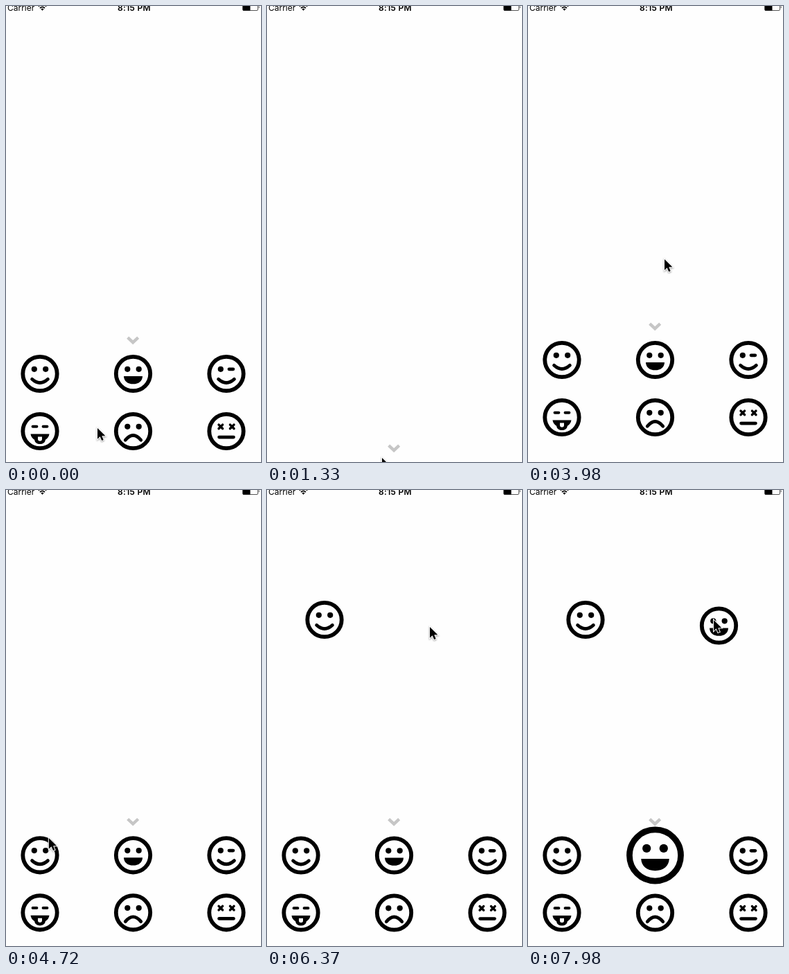
An HTML page that plays this animation: 368 px wide and 659 px high, repeating every 8 s.

```html
<!DOCTYPE html>
<html lang="en">
<head>
<meta charset="utf-8">
<title>Emoticon tray</title>
<style>
  html, body { margin: 0; width: 100%; height: 100%; overflow: hidden; background: #fefefe; }
  svg { display: block; }
  text { font: 12px Inter, Roboto, sans-serif; }
  .line { fill: none; stroke: #000; stroke-linecap: round; stroke-width: 4.8; }
</style>
</head>
<body>
<svg width="368" height="659" viewBox="0 0 368 659">
  <defs>
    <circle id="ring" r="24.7" fill="none" stroke="#000" stroke-width="5.8"/>
    <circle id="dot" r="4.1" cy="-6.7"/>
    <g id="eyes"><use href="#dot" x="-8.2"/><use href="#dot" x="8.2"/></g>
    <path id="curve" class="line" d="M-11.4 7.8Q0 18.2 11.4 7.8"/>
    <path id="cross" class="line" style="stroke-width:3.4" d="M-2.8 -9.4l5.6 5.6m0 -5.6l-5.6 5.6"/>

    <g id="smile"><use href="#ring"/><use href="#eyes"/><use href="#curve"/></g>
    <g id="grin"><use href="#ring"/><use href="#eyes"/>
      <path d="M-13.5 3.4H13.5C13.3 10.4 8 14.8 0 14.8S-13.3 10.4 -13.5 3.4Z"/></g>
    <g id="wink"><use href="#ring"/><use href="#dot" x="-8.2"/><use href="#curve"/>
      <path class="line" d="M4 -6.7H9.8"/></g>
    <g id="tongue"><use href="#ring"/>
      <path class="line" style="stroke-width:4" d="M-10.4 -6.7H-4.6M4.6 -6.7H10.4"/>
      <path d="M-13.5 4H13.5Q12.8 9.6 7.8 12.4C7.4 16.4 4 18.6 0 18.6S-7.4 16.4 -7.8 12.4Q-12.8 9.6 -13.5 4Z"/>
      <path fill="#fefefe" d="M-3 8H3V11.2a3 3 0 0 1 -6 0Z"/></g>
    <g id="sad"><use href="#ring"/><use href="#eyes"/>
      <path class="line" d="M-11.2 12.8Q0 -.8 11.2 12.8"/></g>
    <g id="dead"><use href="#ring"/><use href="#cross" x="-8.2"/><use href="#cross" x="8.2"/>
      <path class="line" d="M-10.4 8.6H10.4"/></g>
  </defs>

  <text x="2" y="6.5">Carrier</text>
  <g fill="none" stroke="#000" stroke-width="1.7">
    <path d="M46.8 .6Q52.5 -4.4 58.2 .6M49 3Q52.5 -.2 56 3"/>
    <path fill="#000" stroke="none" d="M50.4 4.4Q52.5 2.8 54.6 4.4L52.5 6.7Z"/>
  </g>
  <text x="185" y="6.5" text-anchor="middle" style="font-weight:600;letter-spacing:.3px">8:15 PM</text>
  <rect x="341.5" y="-3.5" width="22" height="10" rx="1.5" fill="none" stroke="#555"/>
  <path d="M342 -3H352.5V6.5H342ZM364.8 0q1.6 1.5 0 3.6Z"/>

  <g id="panel">
    <path d="M175.7 479.2L183.2 486.2L190.7 479.2" fill="none" stroke="#c6c6c6" stroke-width="4.4"/>
  </g>
  <use id="smileCopy" href="#smile"/>
  <use id="grinCopy" href="#grin"/>
  <path id="cursor" d="M0 0V15.8L3.7 12.3L6.2 18L8.7 16.9L6.3 11.3H11.4Z"
    stroke="#fff" stroke-width="2" paint-order="stroke" style="filter:drop-shadow(0 1px 1px #0006)"/>
</svg>
<script>
const LOOP = 8000, TICK = 148, LEAD = 18;
const GRAB_TRAY = 3, FLING = 24, GRAB_SMILE = 33, DROP_SMILE = 37, GRAB_GRIN = 48;
const $ = id => document.getElementById(id);
const clamp = v => Math.min(1, Math.max(0, v));
const ease = v => { v = clamp(v); return v * v * (3 - 2 * v); };
const place = (el, x, y, s = 1) => el.setAttribute('transform', `translate(${x} ${y}) scale(${s})`);

// Where the pointer turns or rests: tick, x, y.
const stops = [
  [0, 132, 610], [GRAB_TRAY, 181, 474], [9, 166, 653], [12, 3, 640], [15, 246, 632],
  [19, 182, 634], [FLING, 182, 633], [27, 197, 366], [GRAB_SMILE, 51, 514], [36, 85, 171],
  [39, 83, 190], [43, 235, 198], [GRAB_GRIN, 176, 520], [54, 268, 188]
];

function pointer(n) {
  const i = Math.max(1, stops.findIndex(s => s[0] >= n));
  const [t0, x0, y0] = stops[i - 1], [t1, x1, y1] = stops[i];
  const f = ease((n - t0) / (t1 - t0));
  return [x0 + (x1 - x0) * f, y0 + (y1 - y0) * f];
}

// The tray is pulled down, then springs back a little above its first place.
function trayY(n) {
  if (n < FLING) return 156 * ease((n - GRAB_TRAY) / 5);
  const u = n - FLING;
  return -3.5 + 159.5 * Math.exp(-0.756 * u) * Math.cos(Math.PI * u / 3);
}

const faces = ['smile', 'grin', 'wink', 'tongue', 'sad', 'dead'].map((name, i) => {
  const el = document.createElementNS('http://www.w3.org/2000/svg', 'use');
  el.setAttribute('href', '#' + name);
  $('panel').append(el);
  const x = 49 + 134.5 * (i % 3), y = i < 3 ? 531.5 : 614.5;
  const scale = s => place(el, x, y, s);
  scale(1);
  return { scale };
});

function showCopy(el, shown, x, y) {
  el.style.display = shown ? '' : 'none';
  place(el, x, y);
}

function draw(n) {
  const [x, y] = pointer(n);
  place($('cursor'), x, y);
  place($('panel'), 0, trayY(n));
  faces[0].scale(1 + 0.5 * (clamp(n - GRAB_SMILE + 1) - clamp((n - DROP_SMILE) / 2)));
  faces[1].scale(1 + 0.5 * clamp(n - GRAB_GRIN + 1));
  const held = n < DROP_SMILE;
  showCopy($('smileCopy'), n >= GRAB_SMILE, held ? x - 2 : 83, held ? y + 14.5 : 187.5);
  showCopy($('grinCopy'), n >= GRAB_GRIN, x + 7.5, y + 8);
}

// The picture advances in whole ticks, so each pose is held.
const start = performance.now();
function frame() {
  const t = (performance.now() - start) % LOOP;
  draw(Math.floor((t + LEAD) / TICK));
  requestAnimationFrame(frame);
}
frame();
</script>
</body>
</html>
```
